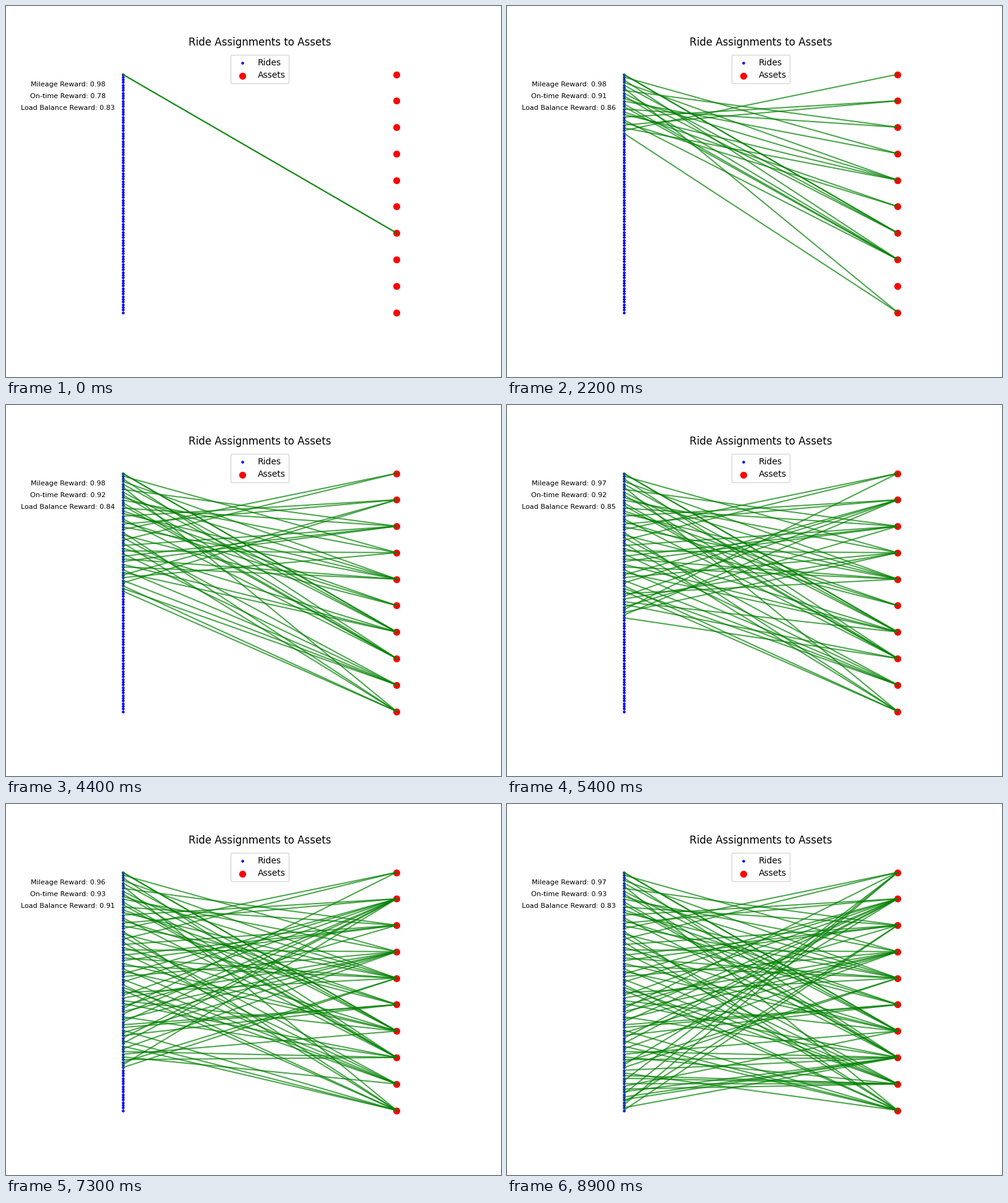
These frames come from a looping animation (800 by 600 pixels, 9000 ms). A matplotlib script:

```python
import numpy as np
import matplotlib.pyplot as plt
from matplotlib.animation import FuncAnimation

RIDES, ASSETS = 90, 10
STEP_MS = 100

# Each ride goes to a random asset, counted from the top.
np.random.seed(42)
assigned = np.random.randint(0, ASSETS, RIDES)

steps = np.arange(RIDES)
rewards = {
    "Mileage": np.interp(steps, [0, 6, 12, 33, 44, 64, 73, 89],
                         [.98, 1, .99, .97, .98, .96, .96, .97]),
    "On-time": 0.935 - 0.155 / (1 + steps / 5),
    "Load Balance": np.interp(steps, [0, 12, 33, 44, 64, 70, 73, 89],
                              [.83, .82, .91, .84, .86, 1, .91, .83]),
}

fig, ax = plt.subplots(figsize=(8, 6), dpi=100)
ax.set_xlim(-0.2, 1.2)
ax.set_ylim(-0.1, 1.1)
ax.axis("off")
ax.set_title("Ride Assignments to Assets")

ride_y = np.linspace(1, 0, RIDES)
asset_y = np.linspace(1, 0, ASSETS)
ax.scatter(np.zeros(RIDES), ride_y, s=5, color="blue", label="Rides")
ax.scatter(np.ones(ASSETS), asset_y, s=50, color="red", label="Assets")
ax.legend(loc="upper center")


def link(ride):
    ends = [ride_y[ride], asset_y[assigned[ride]]]
    return ax.plot([0, 1], ends, color="green", alpha=0.7)[0]


link(0)  # the first assignment is drawn twice, so it looks darker
links = [link(ride) for ride in range(RIDES)]
labels = {name: ax.text(-0.2, 0.95 - 0.05 * row, "", fontsize=8, ha="center")
          for row, name in enumerate(rewards)}


def update(step):
    for ride, line in enumerate(links):
        line.set_visible(ride <= step)
    for name, label in labels.items():
        label.set_text(f"{name} Reward: {rewards[name][step]:.2f}")
    return [*links, *labels.values()]


anim = FuncAnimation(fig, update, frames=RIDES, interval=STEP_MS, repeat=True)
plt.show()
```
